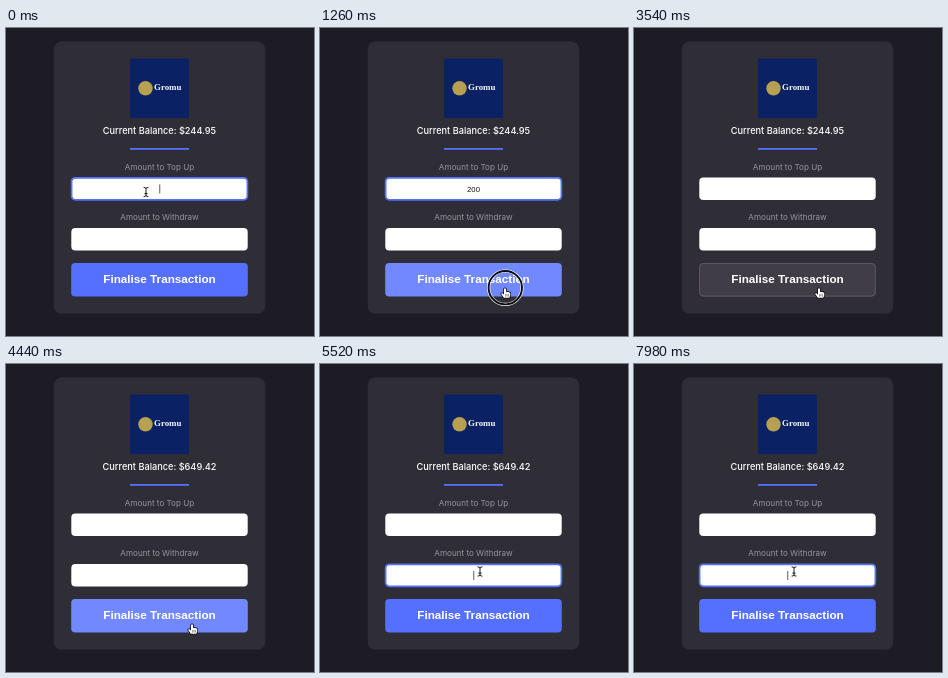
Animation, 308 px wide and 308 px high, one loop 8000 ms. Source, as an HTML page with a canvas:

```html
<!DOCTYPE html>
<html lang="en">
<head>
<meta charset="utf-8">
<title>Top up</title>
<style>
  html, body { margin: 0; width: 100%; height: 100%; overflow: hidden; background: #1d1c25; }
  canvas { display: block; width: 100vw; height: 100vh; }
</style>
</head>
<body>
<canvas id="stage"></canvas>
<script>
const SIZE = 308, LOOP = 8000, CENTER = 153.5;
const canvas = document.getElementById('stage');
const ctx = canvas.getContext('2d');

const SANS = 'Inter, sans-serif';
const ARIAL = '"Liberation Sans", Arial, sans-serif';
const BLUE = [85, 112, 255], BLUE_HOVER = [113, 136, 255], DISABLED = [65, 61, 71];

// Moments of the story, in ms
const KEYS = [200, 350, 500];
const PRESS_1 = 1200, BLUR = 1300, DISABLE = 1380, CLEAR = 2880;
const ENABLE = 3780, NEW_BALANCE = 3900, PRESS_2 = 4900;
const CARET_HALF = 700;

const PATH = [
  { t: 0, x: 140, y: 164 },
  { t: 900, x: 140, y: 164 },
  { t: 1170, x: 185, y: 260 },
  { t: 4260, x: 185, y: 260 },
  { t: 4400, x: 186, y: 260 },
  { t: 4500, x: 186, y: 260 },
  { t: 4840, x: 160, y: 207.5 }
];

const clamp = v => Math.max(0, Math.min(1, v));
const ease = v => v * v * (3 - 2 * v);
const ramp = (t, from, len) => ease(clamp((t - from) / len));
const mix = (a, b, k) => a.map((v, i) => v + (b[i] - v) * k);
const rgb = c => `rgb(${c.map(Math.round).join(',')})`;

function box(x, y, w, h, r, fill, stroke, line) {
  ctx.beginPath();
  ctx.roundRect(x, y, w, h, r);
  if (fill) { ctx.fillStyle = fill; ctx.fill(); }
  if (stroke) { ctx.strokeStyle = stroke; ctx.lineWidth = line; ctx.stroke(); }
}

function text(str, x, y, font, color, align = 'center') {
  ctx.font = font;
  ctx.textAlign = align;
  ctx.fillStyle = color;
  ctx.fillText(str, x, y);
}

function pointer(t) {
  let i = PATH.length - 1;
  while (i > 0 && PATH[i].t > t) i--;
  const a = PATH[i], b = PATH[i + 1] || a;
  const k = a === b ? 0 : ramp(t, a.t, b.t - a.t);
  return { x: a.x + (b.x - a.x) * k, y: a.y + (b.y - a.y) * k };
}

function drawField(y, focused, value, caretAge) {
  box(65.3, y, 176.4, 22.6, 4, '#fff');
  if (focused) box(65.6, y + 0.3, 175.8, 22, 4, null, rgb(BLUE), 1.7);
  const font = '7.75px ' + ARIAL;
  text(value, CENTER, y + 14.2, font, '#15141a');
  if (focused && Math.floor(caretAge / CARET_HALF) % 2 === 0) {
    const x = CENTER + ctx.measureText(value).width / 2;
    ctx.fillStyle = '#33323a';
    ctx.fillRect(x - 0.1, y + 7, 0.8, 9);
  }
}

function drawButton(t) {
  const hover = ramp(t, 1110, 90) * (1 - ramp(t, 4560, 120));
  const off = ramp(t, DISABLE, 120) * (1 - ramp(t, ENABLE, 120));
  const fill = mix(mix(BLUE, BLUE_HOVER, hover), DISABLED, off);
  box(65.2, 235, 176.6, 33.5, 4, rgb(fill));
  if (off > 0) box(65.6, 235.4, 175.8, 32.7, 4, null, `rgba(100,97,107,${off})`, 0.8);
  text('Finalise Transaction', CENTER, 255.3, 'bold 11.7px ' + ARIAL, '#fff');
}

function drawLogo() {
  ctx.fillStyle = '#0a2164';
  ctx.fillRect(124, 30.5, 59, 59.5);
  ctx.fillStyle = '#b8a052';
  ctx.beginPath();
  ctx.arc(139.5, 60.3, 7.2, 0, Math.PI * 2);
  ctx.fill();
  text('Gromu', 148, 61.8, 'bold 8.9px "Liberation Serif", serif', '#f4f5fa', 'left');
}

function outline(path, fill, edge, width) {
  ctx.lineJoin = ctx.lineCap = 'round';
  ctx.strokeStyle = edge;
  ctx.lineWidth = width;
  ctx.stroke(path);
  if (fill) { ctx.fillStyle = fill; ctx.fill(path); }
}

const IBEAM = new Path2D('M-2 -4.6Q0 -4.6 0 -3.4Q0 -4.6 2 -4.6M0 -3.4V3.4M-2 4.6Q0 4.6 0 3.4Q0 4.6 2 4.6M-1.2 1.6H1.2');
const ARROW = new Path2D('M0 0V9L2.1 7.1L3.5 10.2L5 9.5L3.7 6.5H6.4Z');
const HAND = new Path2D('M-1 0.8Q0 -0.5 1 0.8V4Q2 3.2 2.7 4.2Q3.7 3.6 4.2 4.6Q5.3 4.3 5.3 5.5V7.2L4.3 9.8H-1.1L-3.7 6.3Q-4 4.9 -2.6 5.2L-1 6.4Z');
const KNUCKLES = new Path2D('M0.6 6.4V8.2M2 6.4V8.2M3.4 6.4V8.2');

function drawPointer(p) {
  const inside = (top, bottom) => p.x > 65 && p.x < 242 && p.y > top && p.y < bottom;
  ctx.save();
  ctx.translate(p.x, p.y);
  if (inside(149, 172) || inside(200, 223)) {
    outline(IBEAM, null, '#fff', 2);
    outline(IBEAM, null, '#111', 0.95);
  } else if (inside(235, 269)) {
    outline(HAND, '#fff', '#111', 1.5);
    outline(KNUCKLES, null, '#333', 0.5);
  } else {
    outline(ARROW, '#111', '#fff', 1.2);
  }
  ctx.restore();
}

function drawPress(t, start, x, y) {
  const age = t - start;
  if (age < 0 || age > 300) return;
  const grow = clamp((age - 80) / 220);
  ctx.save();
  ctx.globalAlpha = 1 - grow;
  ctx.beginPath();
  ctx.arc(x, y, 16.7 + 7 * grow, 0, Math.PI * 2);
  ctx.strokeStyle = '#fff';
  ctx.lineWidth = 3.2;
  ctx.stroke();
  ctx.strokeStyle = '#0c0c10';
  ctx.lineWidth = 1.9;
  ctx.stroke();
  ctx.restore();
}

function draw(t) {
  ctx.fillStyle = '#1d1c25';
  ctx.fillRect(0, 0, SIZE, SIZE);
  box(47.7, 13.5, 211.6, 272.3, 8, '#2f2e37');
  drawLogo();

  const balance = t < NEW_BALANCE ? '244.95' : '649.42';
  text('Current Balance: $' + balance, CENTER, 106.3, '500 9.2px ' + SANS, '#fff');
  ctx.fillStyle = rgb(BLUE);
  ctx.fillRect(124, 120, 59, 1.8);

  const label = '8.1px ' + SANS;
  text('Amount to Top Up', CENTER, 142, label, '#96959d');
  text('Amount to Withdraw', CENTER, 192.4, label, '#96959d');

  const typed = KEYS.filter(k => k <= t);
  const value = t < CLEAR ? '200'.slice(0, typed.length) : '';
  drawField(149.5, t < BLUR, value, t - (typed[typed.length - 1] || 0));
  drawField(200, t >= PRESS_2, '', t - PRESS_2);
  drawButton(t);

  drawPointer(pointer(t));
  drawPress(t, PRESS_1, 185.3, 259.7);
  drawPress(t, PRESS_2, 160, 207.5);
}

function resize() {
  const ratio = window.devicePixelRatio || 1;
  canvas.width = Math.round(innerWidth * ratio);
  canvas.height = Math.round(innerHeight * ratio);
}

const start = performance.now();
function frame() {
  ctx.setTransform(canvas.width / SIZE, 0, 0, canvas.height / SIZE, 0, 0);
  draw((performance.now() - start) % LOOP);
  requestAnimationFrame(frame);
}

addEventListener('resize', resize);
resize();
frame();
</script>
</body>
</html>
```
